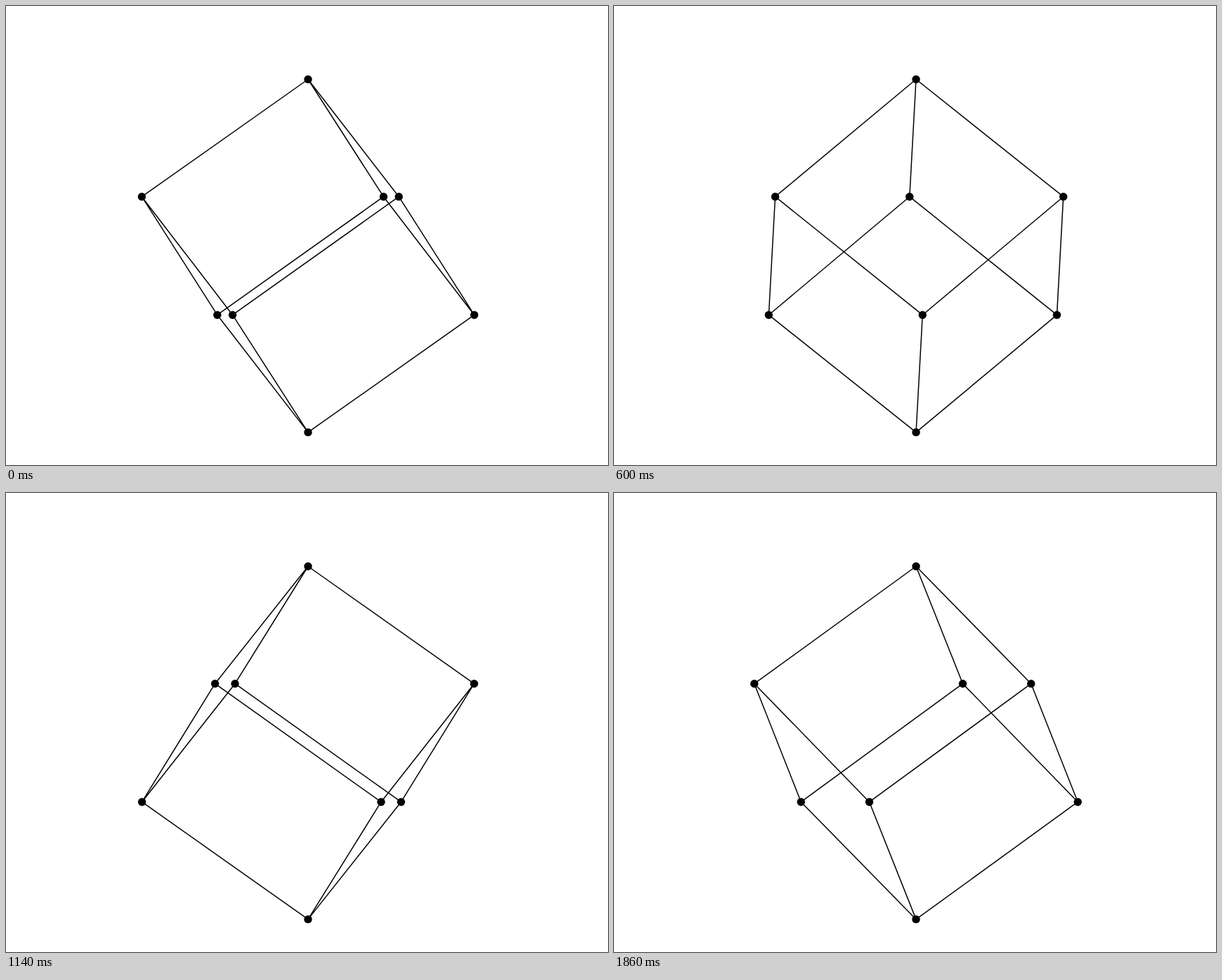
Animation of 857x654 px, one loop 1.92 s. Source, as an HTML page:

```html
<!DOCTYPE html>
<html lang="en">
<head>
<meta charset="utf-8">
<title>Turning cube</title>
<style>
  html, body { margin: 0; width: 100%; height: 100%; overflow: hidden; background: #fff; }
  svg { display: block; width: 100vw; height: 100vh; }
  path { fill: none; stroke: #000; stroke-width: 1.5; stroke-linejoin: round; }
</style>
</head>
<body>
<svg id="stage" viewBox="0 0 857 654"><path id="edges"/></svg>
<script>
const STEP_MS = 60, STEPS = 32;
const START_DEG = -3.04, STEP_DEG = 3.527;
const CENTER_X = 430, RADIUS = 237;
const TOP_Y = 104.5, UPPER_Y = 271.7, LOWER_Y = 440.2, BOTTOM_Y = 607.4;

const stage = document.getElementById("stage");
const edges = document.getElementById("edges");
const dots = Array.from({ length: 8 }, () => {
  const dot = document.createElementNS("http://www.w3.org/2000/svg", "circle");
  dot.setAttribute("r", 5.7);
  return stage.appendChild(dot);
});

const line = (a, b) => `M${a[0]} ${a[1]}L${b[0]} ${b[1]}`;

// A cube standing on one corner, turning about its vertical body diagonal.
function draw(time) {
  const step = Math.floor(time / STEP_MS) % STEPS;
  const turn = START_DEG + STEP_DEG * step;
  const offsets = [180, -60, 60].map(a => RADIUS * Math.cos((turn + a) * Math.PI / 180));
  const top = [CENTER_X, TOP_Y], bottom = [CENTER_X, BOTTOM_Y];
  const upper = offsets.map(x => [CENTER_X + x, UPPER_Y]);
  const lower = offsets.map(x => [CENTER_X - x, LOWER_Y]);

  let d = "";
  upper.forEach((u, i) => {
    d += line(top, u) + line(bottom, lower[i]);
    lower.forEach((l, j) => { if (i !== j) d += line(u, l); });
  });
  edges.setAttribute("d", d);

  [top, bottom, ...upper, ...lower].forEach(([x, y], i) => {
    dots[i].setAttribute("cx", x);
    dots[i].setAttribute("cy", y);
  });
}

const start = performance.now();
function tick() {
  draw(performance.now() - start);
  requestAnimationFrame(tick);
}
tick();
</script>
</body>
</html>
```
